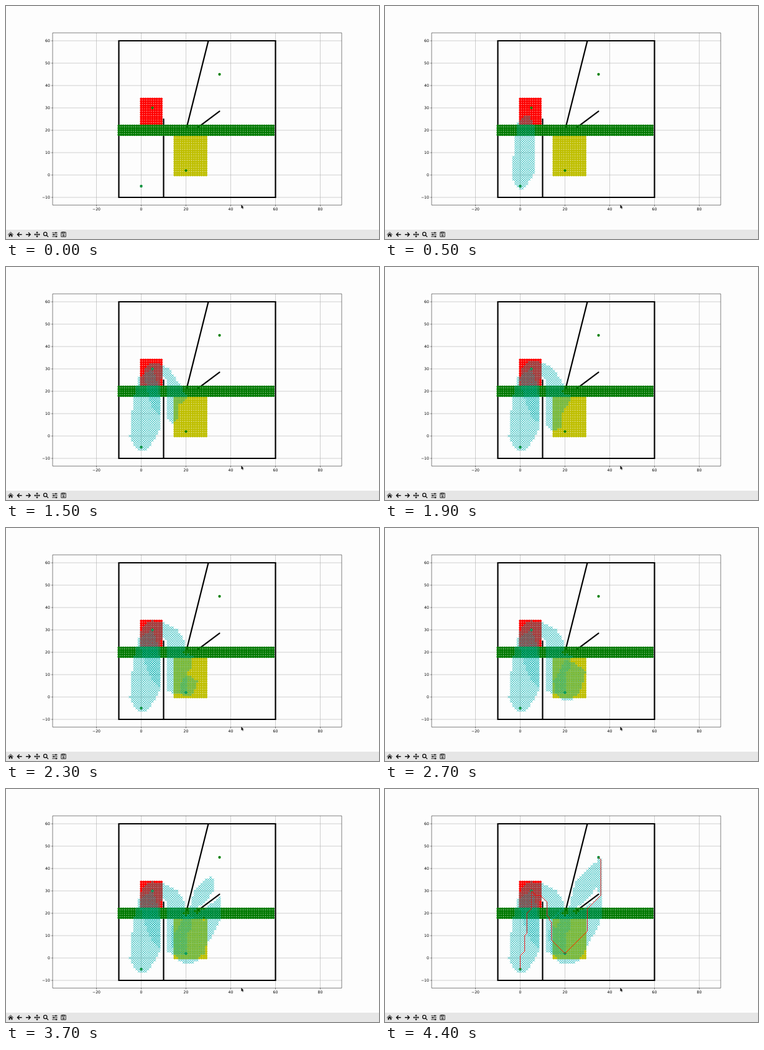
Write an HTML page with a canvas that moves like this. It is 600 px wide and 375 px high and loops after 4.9 s.

```html
<!DOCTYPE html>
<html lang="en">
<head>
<meta charset="utf-8">
<title>Grid path search</title>
<style>
html, body { margin: 0; width: 100%; height: 100%; overflow: hidden; background: #fdfdfd; }
canvas { display: block; }
</style>
</head>
<body>
<canvas id="stage" width="600" height="375"></canvas>
<script>
const ctx = document.getElementById('stage').getContext('2d');
const LOOP = 4900, STEP = 100, SEARCH_TIME = 4200, PATH_TIME = 4300;
const px = x => 217.5 + 3.6 * x;
const py = y => 272 - 3.6 * y;
const range = (from, to, by = 1) =>
  Array.from({ length: Math.floor((to - from) / by) + 1 }, (_, i) => from + i * by);

const walls = [[10, -10, 10, 25], [20, 20, 30, 60], [25, 21, 35, 28.5]];
const stops = [[0, -5], [5, 30], [20, 2], [35, 45]];
const areas = [
  { color: '#f00', x1: 0, x2: 9, y1: 23, y2: 34, extra: .205 },
  { color: '#bfbf00', x1: 15, x2: 29, y1: 0, y2: 17, extra: .45 },
  { color: '#007a00', x1: -10, x2: 59, y1: 18, y2: 22, extra: 0 }
];
const moves = [[1, 0], [0, 1], [-1, 0], [0, -1], [-1, -1], [-1, 1], [1, -1], [1, 1]];

function wallDistance(x, y, [ax, ay, bx, by]) {
  const dx = bx - ax, dy = by - ay;
  const k = ((x - ax) * dx + (y - ay) * dy) / (dx * dx + dy * dy);
  const c = Math.max(0, Math.min(1, k));
  return Math.hypot(x - ax - c * dx, y - ay - c * dy);
}

const isFree = (x, y) => x > -9 && x < 59 && y > -9 && y < 59 &&
  walls.every(w => wallDistance(x, y, w) > 1.0001);

function terrain(x, y) {
  const area = areas.find(a => x >= a.x1 && x <= a.x2 && y >= a.y1 && y <= a.y2);
  return 1 + (area ? area.extra : 0);
}

// A* over the grid; returns the nodes in the order visited and the path found.
function search([sx, sy], [gx, gy]) {
  const open = new Map(), closed = new Set(), visited = [];
  const key = (x, y) => x + ',' + y;
  const total = n => n.cost + Math.hypot(gx - n.x, gy - n.y);
  open.set(key(sx, sy), { x: sx, y: sy, cost: 0 });
  while (open.size) {
    let best = null;
    for (const n of open.values()) if (!best || total(n) < total(best)) best = n;
    visited.push(best);
    if (best.x === gx && best.y === gy) {
      const path = [];
      for (let n = best; n; n = n.parent) path.unshift(n);
      return { visited, path };
    }
    open.delete(key(best.x, best.y));
    closed.add(key(best.x, best.y));
    for (const [dx, dy] of moves) {
      const x = best.x + dx, y = best.y + dy, id = key(x, y);
      if (closed.has(id) || !isFree(x, y)) continue;
      const cost = best.cost + Math.hypot(dx, dy) * terrain(x, y);
      if (!open.has(id) || open.get(id).cost > cost) open.set(id, { x, y, cost, parent: best });
    }
  }
  return { visited, path: [] };
}

const legs = stops.slice(1).map((goal, i) => search(stops[i], goal));
const visited = legs.flatMap(leg => leg.visited);
const route = legs.flatMap(leg => leg.path);

// The search slows a little as the plot fills up.
const visitedBy = time =>
  Math.max(1, Math.round(visited.length * Math.min(1, time / SEARCH_TIME) ** .8));

function stroke(color, width, trace) {
  ctx.strokeStyle = color;
  ctx.lineWidth = width;
  ctx.beginPath();
  trace();
  ctx.stroke();
}

function line(x1, y1, x2, y2) {
  ctx.moveTo(x1, y1);
  ctx.lineTo(x2, y2);
}

function dot(x, y) {
  ctx.beginPath();
  ctx.arc(px(x), py(y), 2.13, 0, 7);
  ctx.fill();
}

function cross({ x, y }) {
  const r = 1.83, cx = px(x), cy = py(y);
  stroke('#00b0b0', .7, () => {
    line(cx - r, cy - r, cx + r, cy + r);
    line(cx - r, cy + r, cx + r, cy - r);
  });
}

function drawAxes() {
  const xs = range(-20, 80, 20), ys = range(-10, 60, 10);
  const label = v => String(v).replace('-', '\u2212');
  stroke('#b0b0b0', .6, () => {
    xs.forEach(x => line(px(x), 43.2, px(x), 320.4));
    ys.forEach(y => line(75, py(y), 540, py(y)));
  });
  stroke('#000', .5, () => {
    ctx.rect(75, 43.2, 465, 277.2);
    xs.forEach(x => line(px(x), 320.4, px(x), 322.5));
    ys.forEach(y => line(72.9, py(y), 75, py(y)));
  });
  ctx.fillStyle = '#000';
  ctx.font = '6.1px "DejaVu Sans", sans-serif';
  ctx.textAlign = 'center';
  xs.forEach(x => ctx.fillText(label(x), px(x), 329.2));
  ctx.textAlign = 'right';
  ys.forEach(y => ctx.fillText(label(y), 70.8, py(y) + 2.2));
}

function arrow(cx, cy, angle, length, width) {
  ctx.save();
  ctx.translate(cx, cy);
  ctx.rotate(angle);
  stroke('#111', width, () => {
    line(-length, 0, length, 0);
    ctx.moveTo(length - 3.2, -3.2);
    ctx.lineTo(length, 0);
    ctx.lineTo(length - 3.2, 3.2);
  });
  ctx.restore();
}

function drawToolbar() {
  ctx.fillStyle = '#e6e6e6';
  ctx.fillRect(0, 360, 600, 15);
  ctx.fillStyle = '#111';
  stroke('#111', 1, () => {
    ctx.moveTo(3.2, 368.2);
    ctx.lineTo(7.5, 364.2);
    ctx.lineTo(11.8, 368.2);
  });
  ctx.fill(new Path2D('M4.6 368.4L7.5 365.8L10.4 368.4V371.6H8.4V369.3H6.6V371.6H4.6Z'));
  arrow(22, 367.8, Math.PI, 3.6, 1.4);
  arrow(35.6, 367.8, 0, 3.6, 1.4);
  stroke('#111', 1.1, () => {
    line(46, 367.8, 54, 367.8);
    line(50, 363.8, 50, 371.8);
  });
  for (let i = 0; i < 4; i++) {
    ctx.save();
    ctx.translate(50, 367.8);
    ctx.rotate(i * Math.PI / 2);
    ctx.fill(new Path2D('M4.8 0L2.7 -2V2Z'));
    ctx.restore();
  }
  stroke('#111', 1.3, () => {
    ctx.arc(63.2, 366.9, 2.7, 0, 7);
    line(65.2, 368.9, 68, 371.7);
  });
  [79.5, 76, 80].forEach((x, i) => {
    const y = 365 + 3 * i;
    stroke('#111', .9, () => line(74.2, y, 82.8, y));
    ctx.fillRect(x, y - 1.2, 1.6, 2.4);
  });
  stroke('#111', .9, () => {
    ctx.rect(88.8, 364, 7.4, 7.4);
    ctx.rect(90.4, 364, 3.6, 2.2);
    ctx.rect(91.4, 368.2, 2.2, 1.8);
  });
}

function drawScene(time) {
  ctx.fillStyle = '#fdfdfd';
  ctx.fillRect(0, 0, 600, 375);
  drawAxes();
  ctx.lineCap = 'round';
  stroke('#000', 2.2, () => {
    ctx.rect(px(-10), py(60), 252, 252);
    walls.forEach(([a, b, c, d]) => line(px(a), py(b), px(c), py(d)));
  });
  ctx.lineCap = 'butt';
  for (const { color, x1, x2, y1, y2 } of areas) {
    ctx.fillStyle = color;
    range(x1, x2).forEach(x => range(y1, y2).forEach(y => dot(x, y)));
  }
  ctx.fillStyle = '#008000';
  stops.forEach(([x, y]) => dot(x, y));
  visited.slice(0, visitedBy(time)).forEach(cross);
  if (time >= PATH_TIME) {
    stroke('#f00', .92, () => route.forEach(({ x, y }) => ctx.lineTo(px(x), py(y))));
  }
  drawToolbar();
  ctx.fillStyle = '#111';
  ctx.fill(new Path2D('M378.4 319.8V325.8L379.8 324.6L380.8 326.8L381.8 326.3L380.8 324.2H382.6Z'));
}

let shown = -1;
function tick() {
  const step = Math.min(44, Math.floor(performance.now() % LOOP / STEP));
  if (step !== shown) drawScene((shown = step) * STEP);
  requestAnimationFrame(tick);
}
tick();
</script>
</body>
</html>
```
